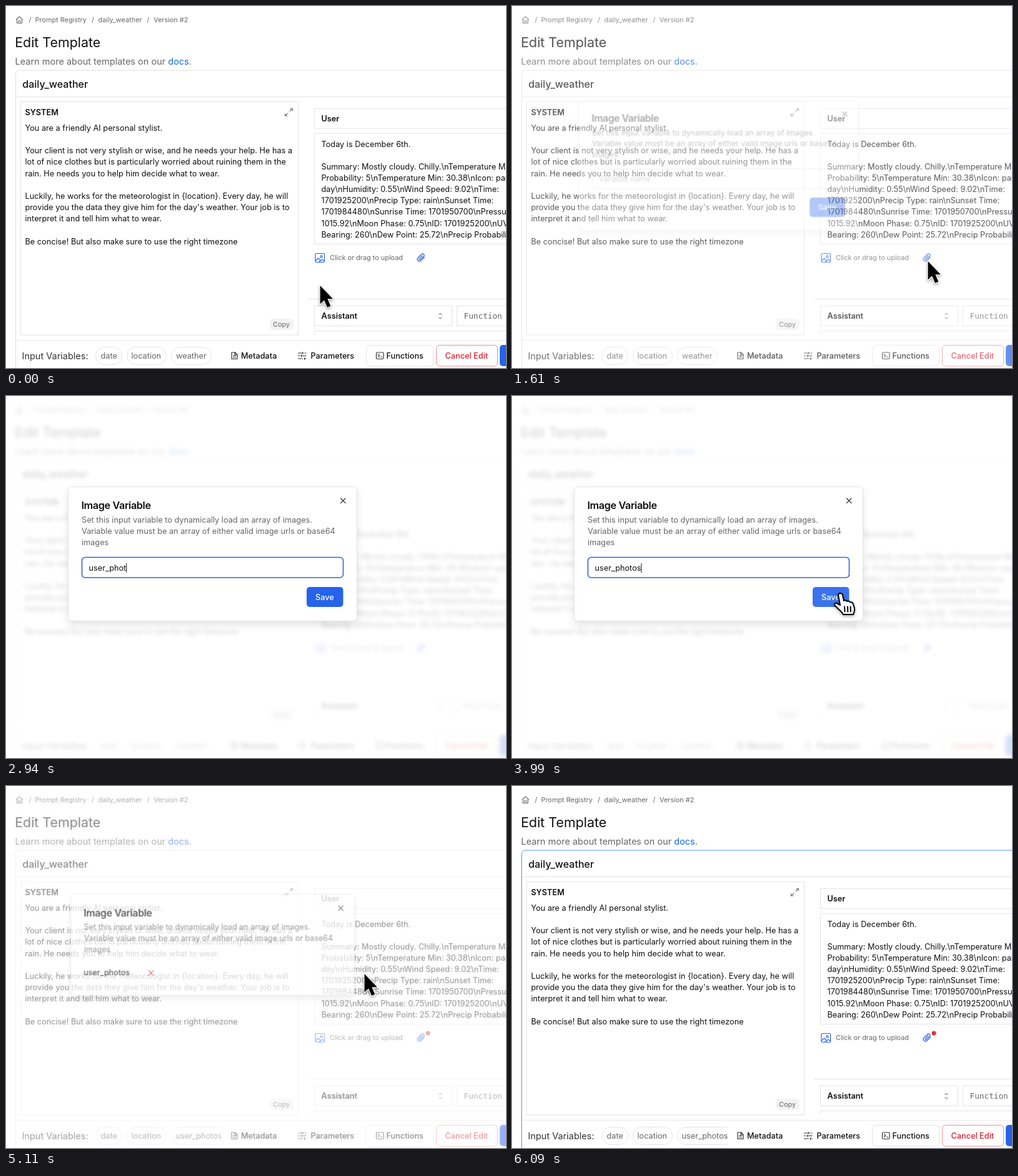
Animation, 800 px wide and 580 px high, one loop 6160 ms. Source, as an HTML page:

```html
<!DOCTYPE html>
<html lang="en">
<head>
<meta charset="utf-8">
<title>Edit Template</title>
<style>
  html, body { margin: 0; width: 100%; height: 100%; overflow: hidden; background: #fff; }
  svg { display: block; font: 12.72px Inter, sans-serif; font-optical-sizing: none; }
  text { fill: #111; white-space: pre; }
  .small { font-size: 10.9px; }
  .large { font-size: 14.5px; }
  .heading { font-size: 16.3px; letter-spacing: -.41px; }
  .muted { fill: #666; }
  .medium { font-weight: 500; }
  .bold { font-weight: 600; }
  .mono { font-family: "DejaVu Sans Mono", monospace; }
  .box { fill: #fff; stroke: #e3e3e6; }
  .icon { fill: none; stroke: #333; stroke-width: 1.2; stroke-linecap: round; stroke-linejoin: round; }
  .icon.blue { stroke: #2563eb; }
  .icon.gray { stroke: #777; }

  .sharp, .blurred, .dialog, .pointer, .on { animation: 6160ms linear infinite; }
  .sharp { animation-name: page-out; }
  .blurred { filter: blur(3px); animation-name: blur-in; }
  .dialog { transform-origin: 330.5px 253px; animation-name: dialog; }
  .pointer { animation-name: path; }
  .on { animation-timing-function: step-end; }
  .before-save { animation-name: before-save; }
  .after-save { animation-name: after-save; }
  .card-focus { animation-name: card-focus; }
  .input-focus { animation-name: input-focus; }
  .caret { animation-name: caret; }
  .cursor { animation-name: cursor; }
  .arrow { animation-name: arrow; }
  .hand { animation-name: hand; }
  .save { fill: #2563eb; animation-name: save; }

  @keyframes page-out { 0%, 25%, 84.42%, 100% { opacity: 1 } 28.9%, 81.82% { opacity: 0 } }
  @keyframes blur-in { 0%, 25%, 84.42%, 100% { opacity: 0 } 28.9%, 81.82% { opacity: .2 } }
  @keyframes dialog {
    0%, 25%, 85.06%, 100% { opacity: 0; transform: translateY(4px) scale(.95) }
    28.25%, 81.82% { opacity: 1; transform: none }
  }
  @keyframes path {
    0% { transform: translate(502px, 447px) }
    11.36% { transform: translate(578px, 445px); animation-timing-function: ease-out }
    22%, 54% { transform: translate(665px, 408px); animation-timing-function: ease-in-out }
    62.5%, 68.5% { transform: translate(525px, 317px); animation-timing-function: ease-in-out }
    80%, 83% { transform: translate(573px, 300px); animation-timing-function: ease-in }
    90.9%, 100% { transform: translate(830px, 330px) }
  }
  @keyframes before-save { 0% { opacity: 1 } 68.18%, 100% { opacity: 0 } }
  @keyframes after-save { 0% { opacity: 0 } 68.18%, 100% { opacity: 1 } }
  @keyframes card-focus { 0% { stroke: #dedee2 } 85.3%, 100% { stroke: #5b8def } }
  @keyframes input-focus { 0% { stroke: #d4d4d8; stroke-width: 1 } 27.27%, 100% { stroke: #3464d9; stroke-width: 1.6 } }
  @keyframes caret { 0% { opacity: 0 } 27.27%, 100% { opacity: 1 } }
  @keyframes cursor { 0%, 53.41% { opacity: 1 } 36.36%, 90.9%, 100% { opacity: 0 } }
  @keyframes arrow { 0%, 25%, 68.18%, 100% { opacity: 1 } 21.59%, 61.36% { opacity: 0 } }
  @keyframes hand { 0%, 25%, 68.18%, 100% { opacity: 0 } 21.59%, 61.36% { opacity: 1 } }
  @keyframes save { 0%, 68.18%, 100% { fill: #2563eb } 61.36% { fill: #3b73ed } }
</style>
</head>
<body>
<svg width="800" height="580" viewBox="0 0 800 580">
  <defs>
    <clipPath id="vars"><rect x="140" y="540" width="205" height="40"/></clipPath>
  </defs>

  <g class="sharp"><g id="page">
    <!-- header -->
    <path class="icon gray" d="M16.5 21.5 21.5 17l5 4.5M17.5 21v6.5h8V21M20 27.5v-4h3v4"/>
    <g class="small">
      <text class="muted" x="36.5" y="26">/</text>
      <text class="muted" x="46.5" y="26">Prompt Registry</text>
      <text class="muted" x="137" y="26">/</text>
      <text class="muted" x="147.5" y="26">daily_weather</text>
      <text class="muted" x="225.5" y="26">/</text>
      <text class="muted" x="236" y="26">Version #2</text>
    </g>
    <text x="14.2" y="66" font-size="21.4">Edit Template</text>
    <text class="large muted" x="14.5" y="93.5">Learn more about templates on our <tspan fill="#1668e8">docs</tspan>.</text>

    <!-- card -->
    <rect class="on card-focus" x="15.5" y="103" width="840" height="520" rx="6" fill="#fff"/>
    <text class="medium" x="26.3" y="130.5" font-size="16">daily_weather</text>
    <path d="M16 145.5H800M483 469.5H800" stroke="#e3e3e6"/>

    <!-- system prompt -->
    <rect class="box" x="23.5" y="153.5" width="444" height="373.5"/>
    <text class="bold" x="30.5" y="174.5">SYSTEM</text>
    <path class="icon gray" d="M454 168.5 458.5 164.5M455 164.5h3.5v3.5M451 172 446.5 176M446.5 172.5V176H450"/>
    <text class="para" x="30.5" y="200">You are a friendly AI personal stylist.||Your client is not very stylish or wise, and he needs your help. He has a|lot of nice clothes but is particularly worried about ruining them in the|rain. He needs you to help him decide what to wear.||Luckily, he works for the meteorologist in {location}. Every day, he will|provide you the data they give him for the day's weather. Your job is to|interpret it and tell him what to wear.||Be concise! But also make sure to use the right timezone</text>
    <rect x="422" y="501" width="38" height="18" rx="5" fill="#f3f3f4"/>
    <text class="small muted" x="427" y="514">Copy</text>

    <!-- messages -->
    <rect class="box" x="493.5" y="164.5" width="340" height="32"/>
    <text class="bold" x="504.5" y="185">User</text>
    <rect class="box" x="493.5" y="204.5" width="340" height="177"/>
    <text class="para" x="504.5" y="225.5">Today is December 6th.||Summary: Mostly cloudy. Chilly.\nTemperature Max:|Probability: 5\nTemperature Min: 30.38\nIcon: partly|day\nHumidity: 0.55\nWind Speed: 9.02\nTime:|1701925200\nPrecip Type: rain\nSunset Time:|1701984480\nSunrise Time: 1701950700\nPressure:|1015.92\nMoon Phase: 0.75\nID: 1701925200\nUV Index|Bearing: 260\nDew Point: 25.72\nPrecip Probability</text>
    <g class="icon blue">
      <rect x="495" y="396.5" width="14.5" height="14" rx="1.5"/>
      <path d="M495.5 408l4-4 3.5 3.5M501 410l5-4 3 2.5"/>
      <circle cx="504.5" cy="401.5" r="1.6"/>
      <path d="M669.5 402.5l-5.5 5.5a3.3 3.3 0 0 1-4.8-4.8l5.8-5.5a2.3 2.3 0 0 1 3.3 3.3l-5.5 5.2a1.1 1.1 0 0 1-1.6-1.6l4.8-4.6"/>
    </g>
    <circle class="on after-save" cx="675" cy="396" r="3.5" fill="#ef2b2b"/>
    <text class="small muted" x="518" y="407">Click or drag to upload</text>
    <rect class="box" x="493.5" y="480.5" width="220" height="32"/>
    <text class="bold" x="504.5" y="501">Assistant</text>
    <path class="icon" d="M692.8 494.5 695 492.3l2.2 2.2M692.8 499 695 501.200l2.2-2.2" style="stroke:#999"/>
    <rect class="box" x="721.5" y="480.5" width="120" height="32"/>
    <text class="mono muted" x="732.5" y="501">Function</text>
    <path d="M493.5 527V520.5H800" fill="none" stroke="#e3e3e6"/>

    <!-- footer -->
    <path d="M16 535.5H800" stroke="#e8e8ea"/>
    <text class="large" x="25.5" y="565.5" style="fill:#333">Input Variables:</text>
    <g clip-path="url(#vars)">
      <rect class="box" x="143.5" y="546.5" width="42" height="28" rx="14"/>
      <text class="muted" x="151.5" y="565">date</text>
      <rect class="box" x="193.5" y="546.5" width="63" height="28" rx="14"/>
      <text class="muted" x="200.5" y="565">location</text>
      <g class="on before-save">
        <rect class="box" x="264.5" y="546.5" width="64" height="28" rx="14"/>
        <text class="muted" x="272" y="565">weather</text>
      </g>
      <g class="on after-save">
        <rect class="box" x="264.5" y="546.5" width="90" height="28" rx="14"/>
        <text class="muted" x="271.5" y="565">user_photos</text>
      </g>
    </g>
    <path class="icon" d="M361 555h5.5l3.5 3.5v7h-9zM366 555v4h4M363.5 560.5h4M363.5 563h4"/>
    <text class="medium" x="376" y="565">Metadata</text>
    <path class="icon" d="M467.5 556h7.5M478 556h2M467.5 560.5h2M472.5 560.5h7.5M467.5 565h7M477.5 565h2.5M475 554.5v3M472.5 559v3M477.5 563.5v3"/>
    <text class="medium" x="487.5" y="565">Parameters</text>
    <rect class="box" x="576.5" y="543.5" width="107" height="33.5" rx="5"/>
    <path class="icon" d="M594 555h8.5q1.5 0 1.5 1.5v7.5q0 1.5-1.5 1.5H594q-1.5 0-1.5-1.5v-7.5q0-1.5 1.5-1.5zM595.5 558l2.2 2.2-2.2 2.2M599.5 562.5h2"/>
    <text class="medium" x="608.5" y="565">Functions</text>
    <rect x="688.5" y="543.5" width="98" height="33.5" rx="5" fill="#fff" stroke="#f38a8a"/>
    <text class="medium" x="702.5" y="565" style="fill:#dc1f2e">Cancel Edit</text>
    <rect x="790" y="543" width="60" height="34" rx="5" fill="#2563eb"/>
  </g></g>
  <use class="blurred" href="#page"/>

  <g class="dialog">
    <g class="on before-save">
      <rect class="box" x="99.5" y="145.5" width="462" height="215" rx="6" style="filter:drop-shadow(0 6px 6px rgba(0,0,0,.1))"/>
      <g id="head">
        <text class="bold heading" x="120.5" y="181">Image Variable</text>
        <path class="icon" d="M535.5 164l7.5 7.5M543 164l-7.5 7.5"/>
        <text class="para muted" x="121" y="203">Set this input variable to dynamically load an array of images.|Variable value must be an array of either valid image urls or base64|images</text>
      </g>
      <rect class="on input-focus" x="121.5" y="258.5" width="418" height="32.5" rx="5" fill="#fff"/>
      <text id="field" x="132.5" y="280"></text>
      <rect id="caret" class="on caret" y="268" width="1" height="15" fill="#111"/>
      <rect class="on save" x="481" y="306" width="58.5" height="32" rx="5"/>
      <text class="medium" x="495" y="326.5" style="fill:#fff">Save</text>
    </g>
    <g class="on after-save">
      <rect class="box" x="99.5" y="170.5" width="462" height="165" rx="6" style="filter:drop-shadow(0 6px 6px rgba(0,0,0,.1))"/>
      <use href="#head" y="25.5"/>
      <text class="medium" x="120.5" y="303">user_photos</text>
      <path class="icon" d="M226 294.5l8.5 8.5M234.5 294.5l-8.5 8.5" style="stroke:#e5323b"/>
    </g>
  </g>

  <g class="pointer" style="filter:drop-shadow(0 2px 2px rgba(0,0,0,.35))"><g class="on cursor" stroke-linejoin="round">
    <path class="on arrow" d="M.5 1V30.5L7 24.500 12 36 17.300 33.700 12.400 22.300H21Z" stroke="#fff" stroke-width="2.5" paint-order="stroke"/>
    <g class="on hand" fill="#fff" stroke="#000" stroke-width="2" stroke-linecap="round">
      <path d="M-3 2.5Q-3-1 0-1 3-1 4 2L6 11Q9 9 11 12 14 10.5 16 13.5 19.5 12.5 21 16.5L23 23Q23.5 28 21 33H5Q2 28-3 24L-8.5 18.5Q-10 14.5-5.5 15L0 18Z"/>
      <path d="M7 20.5l.5 8M12 20.5l.3 8M16.5 20.5l.3 8"/>
    </g>
  </g></g>
</svg>
<script>
  const LOOP = 6160, STEP = 70, LINE = 18.15;
  const NAME = 'user_photos';
  const field = document.getElementById('field');
  const caret = document.getElementById('caret');

  for (const para of document.querySelectorAll('.para')) {
    const x = para.getAttribute('x'), y = +para.getAttribute('y');
    const lines = para.textContent.split('|');
    para.textContent = '';
    lines.forEach((line, i) => {
      const span = document.createElementNS('http://www.w3.org/2000/svg', 'tspan');
      span.setAttribute('x', x);
      span.setAttribute('y', y + i * LINE);
      span.textContent = line;
      para.append(span);
    });
  }

  // "user", a short pause, then the rest
  function typed(t) {
    const keys = (from, max) => Math.max(0, Math.min(max, Math.floor((t - from) / STEP) + 1));
    return NAME.slice(0, keys(2240, 4) + keys(2660, 7));
  }

  let start;
  function draw(now) {
    start ??= now;
    const value = typed((now - start) % LOOP);
    field.textContent = value || 'Variable name';
    field.style.fill = value ? '#111' : '#999';
    caret.setAttribute('x', 132.5 + (value ? field.getComputedTextLength() : 0));
    requestAnimationFrame(draw);
  }
  requestAnimationFrame(draw);
</script>
</body>
</html>
```
